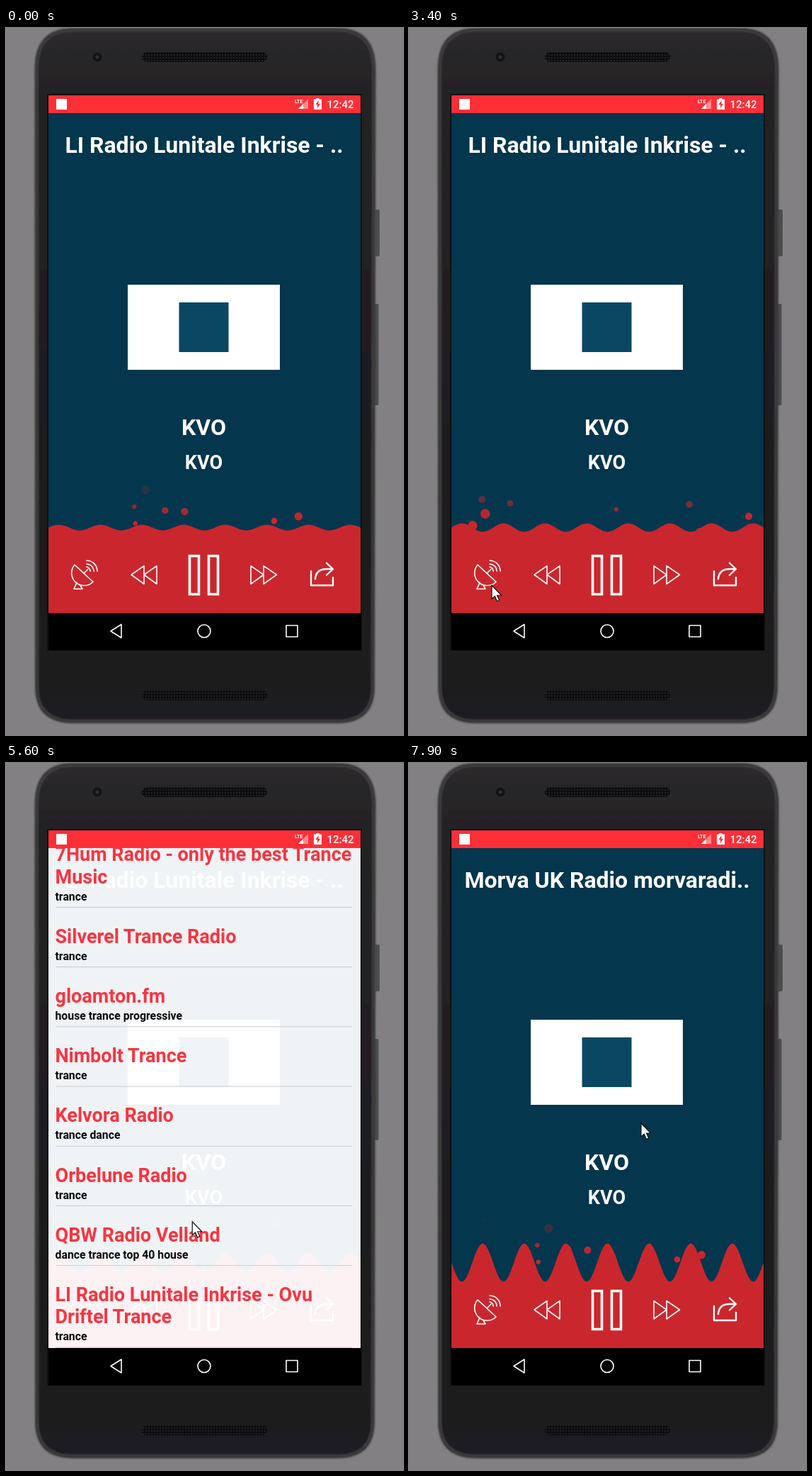
Recreate the animation shown at these times as an HTML page. Size 561 by 997 pixels, loop 8000 ms.

```html
<!DOCTYPE html>
<html lang="en">
<head>
<meta charset="utf-8">
<title>Radio player</title>
<style>
  html, body { margin: 0; width: 100%; height: 100%; overflow: hidden; background: #828082; }
  svg { display: block; width: 100%; height: 100%; font-family: Roboto, "Liberation Sans", sans-serif; font-weight: 700; }
  .mid { text-anchor: middle; fill: #fff; }
  .line { fill: none; stroke: #fff; stroke-width: 1.6; stroke-linejoin: round; stroke-linecap: round; }
  .name { font-size: 27px; fill: #fa3440; }
  .tags { font-size: 15.8px; fill: #080808; }
  .rule { stroke: #c8cbcc; stroke-width: 1; }
  .red { fill: #c9272d; }
</style>
</head>
<body>
<svg viewBox="0 0 561 997">
  <defs>
    <linearGradient id="body" x1="0" y1="0" x2="0" y2="1">
      <stop offset="0" stop-color="#2b2a2c"/>
      <stop offset=".1" stop-color="#232224"/>
      <stop offset=".88" stop-color="#1c1b1d"/>
      <stop offset="1" stop-color="#201f21"/>
    </linearGradient>
    <pattern id="mesh" width="4" height="4" patternUnits="userSpaceOnUse">
      <rect width="4" height="4" fill="#0d0c0e"/>
      <circle cx="2" cy="2" r="1" fill="#29282a"/>
    </pattern>
    <filter id="soft"><feGaussianBlur stdDeviation=".8"/></filter>
    <clipPath id="app"><rect x="60" y="120" width="441" height="705"/></clipPath>
  </defs>

  <!-- phone -->
  <rect width="561" height="997" fill="#828082"/>
  <path d="M522 256h4q2 0 2 2v62q0 2-2 2h-4zM521 389h4q1.500 0 1.500 2v139q0 2-1.500 2h-4z" fill="#4d4c4e"/>
  <g filter="url(#soft)">
    <path d="M95 1.500H468Q521 1.500 521 58L519.500 930Q519 979 468 979H95Q43 979 42.500 930L42 58Q42 1.500 95 1.500Z" fill="url(#body)" stroke="#353436" stroke-width="3"/>
    <path d="M95 4H468Q518.500 4 518.500 58L517 930Q516.500 976.500 468 976.500H95Q45.500 976.500 45 930L44.500 58Q44.500 4 95 4Z" fill="none" stroke="#4b4a4c" stroke-width="1.500"/>
  </g>
  <rect x="192" y="34" width="177" height="14" rx="7" fill="url(#mesh)"/>
  <rect x="192" y="934" width="177" height="14" rx="7" fill="url(#mesh)"/>
  <circle cx="129" cy="41" r="6.500" fill="#131214"/>
  <circle cx="129" cy="41" r="2.500" fill="#2e3036"/>
  <rect x="58" y="93" width="445" height="785" fill="#111012"/>

  <!-- status bar -->
  <rect x="60" y="95" width="441" height="25" fill="#ff2f38"/>
  <rect x="71" y="100" width="15" height="15" fill="#fff"/>
  <text x="408" y="106" font-size="7" fill="#fff">LTE</text>
  <path d="M413 114L427 100V114Z" fill="#fff" fill-opacity=".45"/>
  <path d="M413 114L420 107V114Z" fill="#fff"/>
  <path d="M438.500 99h4v1.500h3.500V115h-11V100.500h3.500z" fill="#fff"/>
  <path d="M441.500 102l-4 6h2.500v5l4-6h-2.500z" fill="#ff2f38"/>
  <text x="453.500" y="113" font-size="15" font-weight="500" fill="#fff">12:42</text>

  <!-- player -->
  <g clip-path="url(#app)">
    <rect x="60" y="120" width="441" height="705" fill="#04364d"/>
    <text id="title" class="mid" x="280" y="176" font-size="32"></text>
    <rect x="172" y="362" width="215" height="120" fill="#fff"/>
    <rect x="244.500" y="387" width="70" height="70" fill="#0a4763"/>
    <text class="mid" x="279.500" y="574" font-size="32">KVO</text>
    <text class="mid" x="279.500" y="622" font-size="27">KVO</text>
    <g id="bubbles" class="red"></g>
    <path id="wave" class="red"/>

    <g class="line">
      <path d="M97 757A17.700 17.700 0 0 0 123 781ZM100 782L96 791H108L105 786M110 769L116 763"/>
      <path d="M114 760A6 6 0 0 1 119 766M114 756A10 10 0 0 1 124 766M114 751A15 15 0 0 1 129 766"/>
      <path d="M195 758.500V784L177 771ZM213 758.500V784L195 771Z"/>
      <path d="M346 758.500V784L364 771ZM364 758.500V784L382.500 771Z"/>
      <path d="M259.500 744.500h13v54h-13zM286.500 744.500h13v54h-13z" stroke-width="3.600" stroke-linejoin="miter"/>
      <path d="M431 766V786H462V775M437 777Q438 763 453 763H461M453 754.500L462 763L453 771.500" stroke-width="2.400"/>
    </g>

    <!-- station list -->
    <g id="list">
      <rect x="60" y="120" width="441" height="705" fill="#fff" fill-opacity=".94"/>
      <g id="rows"></g>
    </g>
  </g>

  <!-- navigation bar -->
  <rect x="60" y="825" width="442" height="52.500" fill="#000"/>
  <g class="line" stroke-width="2">
    <path d="M163 841V860L148 850.500Z"/>
    <circle cx="280" cy="850.500" r="9"/>
    <rect x="396" y="842.500" width="16" height="16"/>
  </g>

  <path id="cursor" d="M0 0V19L4.300 15.200L7.400 22.400L10.600 21L7.600 14H13.500Z" fill="#fff" stroke="#111" stroke-width="1.200"/>
</svg>

<script>
const LOOP = 8000, STEP = 100;
const LEFT = 60, RIGHT = 501, BOTTOM = 825;
const $ = id => document.getElementById(id);

function add(parent, tag, attrs, text = "") {
  const el = document.createElementNS("http://www.w3.org/2000/svg", tag);
  for (const key in attrs) el.setAttribute(key, attrs[key]);
  el.textContent = text;
  return parent.appendChild(el);
}

const clamp = u => Math.max(0, Math.min(1, u));
const ease = u => (1 - Math.cos(Math.PI * clamp(u))) / 2;
const ramp = (t, from, to) => ease((t - from) / (to - from));
const random = seed => {
  const v = Math.sin(seed * 12.9898) * 43758.5453;
  return v - Math.floor(v);
};

// Value of one column of a short key list, eased between neighbours.
function track(keys, t, col = 1) {
  return keys.slice(1).reduce((v, key, i) =>
    v + (key[col] - keys[i][col]) * ramp(t, keys[i][0], key[0]), keys[0][col]);
}

// Station list
const stations = [
  ["LI Radio Lunitale Inkrise - KVO\nTrance", "trance"],
  ["!Tonebarrel.pl - Vocal Trance,\nElectronic, Dance", "electronic techno trance"],
  ["KLToner Sweden - Best of Techno\n& Trance | www.kltoner.se", "techno trance eurodance"],
  ["Trance Zelmar Radio", "trance"],
  ["7Hum Radio - only the best Trance\nMusic", "trance"],
  ["Silverel Trance Radio", "trance"],
  ["gloamton.fm", "house trance progressive"],
  ["Nimbolt Trance", "trance"],
  ["Kelvora Radio", "trance dance"],
  ["Orbelune Radio", "trance"],
  ["QBW Radio Velland", "dance trance top 40 house"],
  ["LI Radio Lunitale Inkrise - Ovu\nDriftel Trance", "trance"],
  ["Velurn4.FM", "trance electronic dance"],
  ["CobaltHarmon", "trance"],
  ["Oxel Radio UK", "house dance trance electronic techno"],
  ["Morva UK Radio morvaradiouk", "dance house trance electro drum"],
  ["!ToneBarrel.pl - Trance,\nProgressive, Psychedelic, Goa", "trance techno"]
];
const LINE = 31.4, ROW = 84.2, LIST_END = 814;
let rowTop = 119.5;
for (const [name, tags] of stations) {
  const lines = name.split("\n"), extra = (lines.length - 1) * LINE;
  lines.forEach((line, n) =>
    add($("rows"), "text", { class: "name", x: 69.5, y: rowTop + 50.4 + n * LINE }, line));
  add($("rows"), "text", { class: "tags", x: 69.5, y: rowTop + 74.3 + extra }, tags);
  rowTop += ROW + extra;
  add($("rows"), "line", { class: "rule", x1: 70, x2: 489, y1: rowTop, y2: rowTop });
}
const scrollEnd = rowTop - LIST_END;

// Standing wave: seven and a half crests whose height follows the music.
const LEVEL = 704.5, PERIOD = (RIGHT - LEFT) / 7.5;
const swell = [[0, 4], [1200, 13], [2100, 30], [3400, 6], [4900, 25], [6400, 0], [7900, -27]];

function wavePath(height) {
  let d = `M${LEFT} ${BOTTOM}`;
  for (let x = LEFT; x <= RIGHT; x += 3)
    d += `L${x} ${(LEVEL - height * Math.sin(2 * Math.PI * (x - LEFT) / PERIOD)).toFixed(1)}`;
  return d + `V${BOTTOM}Z`;
}

// Bubbles rise out of the wave and fade, each life at a new random place.
const LIFE = 1600;
const bubbles = Array.from({ length: 9 }, () => add($("bubbles"), "circle", {}));

function drawBubble(el, i, t) {
  const life = (t / LIFE + random(i + 1)) % (LOOP / LIFE);
  const seed = i * 10 + Math.floor(life) + 50;
  const y = 725 - 80 * (life % 1);
  el.setAttribute("cx", LEFT + 10 + random(seed) * (RIGHT - LEFT - 20));
  el.setAttribute("cy", y);
  el.setAttribute("r", 3 + 4 * random(seed + 0.5));
  el.setAttribute("opacity", clamp((y - 643) / 48));
}

const pointer = [[1000, 362, 852], [1200, 347, 765], [2100, 355, 780], [3200, 117, 786],
  [4200, 117, 786], [4900, 275, 635], [6200, 254, 656], [6900, 254, 656], [7700, 328, 508]];

function draw(t) {
  $("wave").setAttribute("d", wavePath(track(swell, t)));
  bubbles.forEach((el, i) => drawBubble(el, i, t));
  $("title").textContent = t < 6800 ? "LI Radio Lunitale Inkrise - .." : "Morva UK Radio morvaradi..";
  $("list").setAttribute("opacity", ramp(t, 3900, 4200) - ramp(t, 6800, 7100));
  $("rows").setAttribute("transform", `translate(0 ${-scrollEnd * ramp(t, 5000, 6200)})`);
  $("cursor").setAttribute("transform", `translate(${track(pointer, t)} ${track(pointer, t, 2)})`);
  $("cursor").setAttribute("visibility", t < 1000 ? "hidden" : "visible");
}

let start;
function tick(now) {
  start ??= now;
  draw(Math.floor((now - start) % LOOP / STEP) * STEP);
  requestAnimationFrame(tick);
}
draw(0);
requestAnimationFrame(tick);
</script>
</body>
</html>
```
